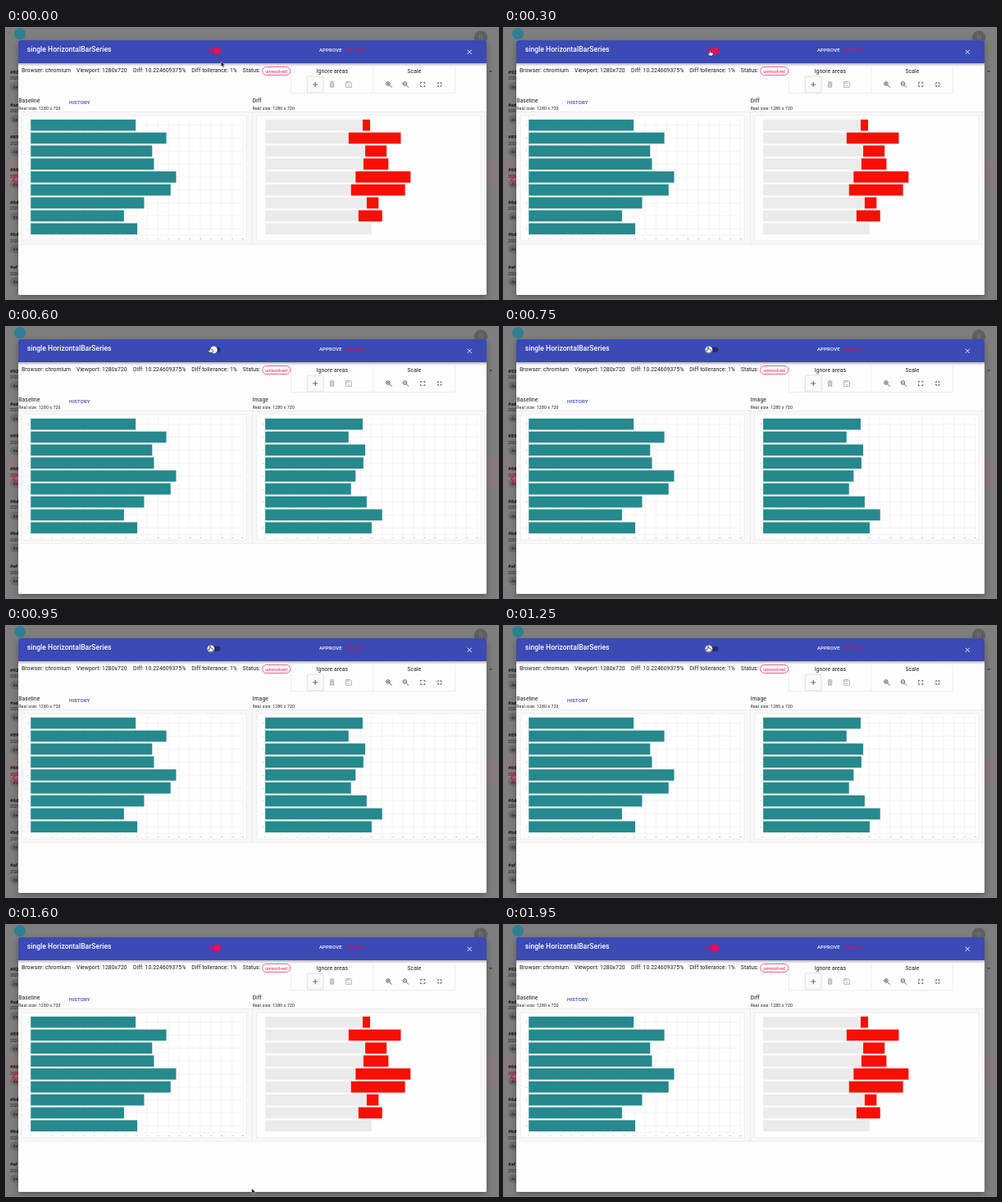
These frames come from a looping animation (600 px wide and 331 px high, 2 s). An HTML page:

```html
<!DOCTYPE html>
<html lang="en">
<head>
<meta charset="utf-8">
<title>Visual comparison dialog</title>
<style>
  html, body { margin: 0; width: 100%; height: 100%; overflow: hidden; background: #7e7e7e; }
  svg { display: block; width: 600px; height: 331px; }
  text { font-family: Roboto, Arial, sans-serif; font-size: 6.8px; letter-spacing: .00938em; fill: #1c1c1c; }
  .title { font-size: 8.5px; font-weight: 500; letter-spacing: .0075em; fill: #fff; }
  .button { font-size: 5.95px; font-weight: 500; letter-spacing: .02857em; }
  .caption { font-size: 5.1px; letter-spacing: .03333em; }
  .chip { font-size: 5.5px; letter-spacing: 0; fill: #e51c55; }
  .tick { font-size: 2.4px; fill: #555; text-anchor: middle; }
  .row { font-size: 5.9px; font-weight: 700; fill: #111; }
  .small { font-size: 5.1px; fill: #222; }
  .icon { fill: none; stroke: #555; stroke-width: .9; }
  .icon.off { stroke: #adadad; }
  .line { fill: none; stroke: #e5e5e5; stroke-width: .7; }
</style>
</head>
<body>
<svg viewBox="0 0 600 331" xmlns="http://www.w3.org/2000/svg">
  <defs>
    <filter id="shadow" x="-5%" y="-5%" width="110%" height="115%">
      <feDropShadow dx="0" dy="3" stdDeviation="4.5" flood-opacity=".3"/>
    </filter>
    <linearGradient id="barShadow" x2="0" y2="1">
      <stop stop-opacity=".28"/>
      <stop offset="1" stop-opacity="0"/>
    </linearGradient>
    <clipPath id="leftEdge"><rect width="15" height="331"/></clipPath>
  </defs>

  <rect width="600" height="331" fill="#7e7e7e"/>
  <circle cx="17" cy="7" r="7" fill="#2f7f92"/>
  <circle cx="579" cy="11.5" r="8.3" fill="#5f5f5f"/>
  <text x="579" y="14.7" text-anchor="middle" style="font-size:8.5px;fill:#808080">fi</text>
  <rect y="161" width="600" height="34.5" fill="#887b7e"/>
  <g id="page" clip-path="url(#leftEdge)"></g>
  <path d="M589 52.3h4l-2 2z" fill="#333"/>

  <rect x="15" y="15" width="571" height="311" rx="1.5" fill="#fefdfe" filter="url(#shadow)"/>
  <rect x="15" y="43" width="571" height="4" fill="url(#barShadow)"/>
  <path d="M15 43V16.5q0-1.5 1.5-1.5h568q1.5 0 1.5 1.5V43z" fill="#3b4ab4"/>
  <path d="M15.5 178.7L8.4 185.5l7.1 6.7" fill="none" stroke="#e3104f" stroke-width="1.5"/>

  <text class="title" x="25.7" y="29">single HorizontalBarSeries</text>
  <text class="button" x="382" y="29" style="fill:#fff">APPROVE</text>
  <text class="button" x="415.5" y="29" style="fill:#dc1457">REJECT</text>
  <path class="icon" d="M562.7 26.7l5.2 5.2m0-5.2l-5.2 5.2" style="stroke:#fff"/>

  <text x="19" y="54">Browser: chromium</text>
  <text x="86" y="54">Viewport: 1280x720</text>
  <text x="155" y="54">Diff: 10.224609375%</text>
  <text x="226.3" y="54">Diff tollerance: 1%</text>
  <text x="288.8" y="54">Status:</text>
  <rect x="312.6" y="47.5" width="34.2" height="10" rx="5" fill="#fff" stroke="#e51c55" stroke-width=".7"/>
  <text class="chip" x="316.2" y="54.5">unresolved</text>

  <path class="line" d="M347.5 47.5V79.7H547.5V47.5M448 47.5V79.7"/>
  <text x="378.7" y="54.6">Ignore areas</text>
  <text x="489.5" y="54.6">Scale</text>
  <rect x="367.3" y="59" width="19.8" height="20" rx="1" fill="#fafafa" stroke="#d6d6d6" stroke-width=".7"/>
  <g id="icons"></g>

  <rect x="15" y="102.5" width="570.5" height="161.7" fill="#f8f7f9"/>
  <path class="line" d="M15 102.5H585.5M15 264.2H585.5M300.5 102.5V264.2"/>
  <text x="15.3" y="90.6">Baseline</text>
  <text class="caption" x="15.3" y="99.5">Real size: 1280 x 720</text>
  <text class="button" x="77" y="93" style="fill:#3546b0">HISTORY</text>
  <text id="viewName" x="300.7" y="90.6">Diff</text>
  <text class="caption" x="300.7" y="99.5">Real size: 1280 x 720</text>
  <g id="baseline"></g>
  <g id="image"></g>
  <g id="diff"></g>

  <rect id="track" x="247" y="24.8" width="14.4" height="6" rx="3"/>
  <circle id="thumb" cy="27.8" r="4.4"/>
  <g id="cursor">
    <path id="arrow" d="M0 0V6.3L1.5 5L2.5 7.3L3.6 6.8L2.6 4.6H4.6Z" fill="#111" stroke="#fff" stroke-width=".4"/>
    <path id="hand" d="M-.7 .5Q0-.5 .7 .5V2.8L3 3.3Q4 3.6 3.9 4.6L3.2 7H-.7L-2.7 4.6Q-2.6 3.5-.7 4.4Z" fill="#fff" stroke="#222" stroke-width=".65"/>
  </g>
</svg>
<script>
const $ = id => document.getElementById(id);

function add(parent, tag, attrs, label) {
  const el = document.createElementNS('http://www.w3.org/2000/svg', tag);
  for (const key in attrs) el.setAttribute(key, attrs[key]);
  if (label !== undefined) el.textContent = label;
  parent.append(el);
  return el;
}

// Page behind the dialog
['#92', '#ad', '#89', '#66', '#6d', '#bd', '#af'].forEach((id, i) => {
  const y = 55.8 + i * 39.7;
  add($('page'), 'text', { x: 5, y, class: 'row' }, id);
  add($('page'), 'text', { x: 5, y: y + 7.6, class: 'small' }, '2020');
  add($('page'), 'rect', { x: 5, y: y + 11, width: 24, height: 10, rx: 5, fill: '#6d6d6d' });
  add($('page'), 'text', { x: 8.5, y: y + 18, class: 'small' }, 'de');
});

// Toolbar icons, each drawn around its own centre
const PLUS = 'M-3 0h6M0-3v6';
const BIN = 'M-2.1-1.6h4.2V3.2h-4.2zM-3-3h6M-1-3.6h2M-.7-1.6v4.8M.7-1.6v4.8';
const DISK = 'M-3.4-3.4h5.4l1.4 1.4v5.4h-6.8zM-3-1.9h4.4M-1 1.4h2';
const LENS = 'M1-1a2.3 2.3 0 1 1-4.6 0a2.3 2.3 0 1 1 4.6 0M.4 .7L3.4 3.7M-2.4-1h2.2';

function icon(column, d, type = '', turns = 1) {
  const x = column < 3 ? 377.2 + column * 20.4 : 467.2 + (column - 3) * 20.5;
  for (let i = 0; i < turns; i++) {
    add($('icons'), 'path', { d, class: 'icon ' + type, transform: `translate(${x} 69) rotate(${i * 90})` });
  }
}
icon(0, PLUS);
icon(1, BIN, 'off');
icon(2, DISK, 'off');
icon(3, LENS + 'M-1.3-2.1v2.2');
icon(4, LENS);
icon(5, 'M-2.6-.9V-2.6H-.9', '', 4);
icon(6, 'M-3-1.3h1.7V-3', '', 4);

// Charts, values in axis units
const before = [9.9, 12.8, 11.46, 11.63, 13.72, 13.2, 10.7, 8.8, 10.05];
const after = [9.2, 7.87, 9.44, 9.27, 8.53, 8.1, 9.58, 11.04, 10.05];
const LEFT = 30.2, RIGHT = 316.1, TOP = 111.8, STEP = 15.83, BAR = 13.7, UNIT = 12.92;

function bar(group, x, i, from, to, fill) {
  add(group, 'rect', { x: x + from * UNIT, y: TOP + i * STEP, width: (to - from) * UNIT, height: BAR, fill });
}

function card(group, x) {
  add(group, 'rect', { x: x - 10.2, y: 107, width: 273.1, height: 153, fill: '#fefefe', stroke: '#e4e4e4', 'stroke-width': .6 });
}

function chart(group, x, values) {
  card(group, x);
  let grid = '';
  for (let k = 0; k <= 20; k++) {
    grid += `M${x + k * UNIT} 111V253.5`;
    add(group, 'text', { x: x + k * UNIT, y: 258.3, class: 'tick' }, k);
  }
  values.forEach((_, i) => grid += `M${x} ${TOP + i * STEP + BAR / 2}h${20 * UNIT}`);
  add(group, 'path', { d: grid + `M${x} 253.5h${20 * UNIT}`, stroke: '#e8e8e8', 'stroke-width': .5 });
  values.forEach((value, i) => {
    bar(group, x, i, 0, value, '#26898d');
    add(group, 'text', { x: x - 3, y: TOP + i * STEP + 7.6, class: 'tick' }, 8 - i);
  });
}

chart($('baseline'), LEFT, before);
chart($('image'), RIGHT, after);
card($('diff'), RIGHT);
before.forEach((value, i) => {
  const low = Math.min(value, after[i]), high = Math.max(value, after[i]);
  bar($('diff'), RIGHT, i, 0, low, '#ebebeb');
  bar($('diff'), RIGHT, i, low, high, '#f70f02');
});

// Motion: the pointer reaches the switch, clicks twice, then drops off the stage
const LOOP = 2000, BEAT = 50, OFF_AT = 600, ON_AT = 1300, SLIDE = 150;
const start = { x: 262.4, y: 41 }, rest = { x: 249, y: 24.3 }, exit = { x: 299.7, y: 321.8 };

const mix = (a, b, p) => a + (b - a) * p;
const phase = (t, from, length) => Math.min(1, Math.max(0, (t - from) / length));
const easeOut = p => 1 - (1 - p) ** 2;

function pointerAt(t) {
  const arrive = easeOut(phase(t, 0, 500));
  const leave = Math.max(0, (t - 1350) / 250) ** 2;
  const place = axis => mix(mix(start[axis], rest[axis], arrive), exit[axis], leave);
  return { x: place('x'), y: place('y') };
}

function show(id, on) {
  $(id).style.display = on ? '' : 'none';
}

function draw(now) {
  const t = Math.floor(now % LOOP / BEAT) * BEAT;
  const on = t < OFF_AT || t >= ON_AT;
  show('diff', on);
  show('image', !on);
  $('viewName').textContent = on ? 'Diff' : 'Image';

  const slid = easeOut(phase(t, OFF_AT - BEAT, SLIDE)) - easeOut(phase(t, ON_AT, SLIDE));
  const tinted = on && slid < 1;
  $('track').setAttribute('fill', tinted ? '#f50057' : '#000');
  $('track').setAttribute('opacity', tinted ? .55 : .4);
  $('thumb').setAttribute('fill', on ? '#f50a50' : '#fafafa');
  $('thumb').setAttribute('cx', mix(257.8, 249.8, slid));

  const { x, y } = pointerAt(t);
  const over = Math.abs(x - 254) < 11 && y < 33;
  $('cursor').setAttribute('transform', `translate(${x} ${y})`);
  show('hand', over);
  show('arrow', !over);
}

function frame() {
  draw(performance.now());
  requestAnimationFrame(frame);
}
frame();
</script>
</body>
</html>
```
